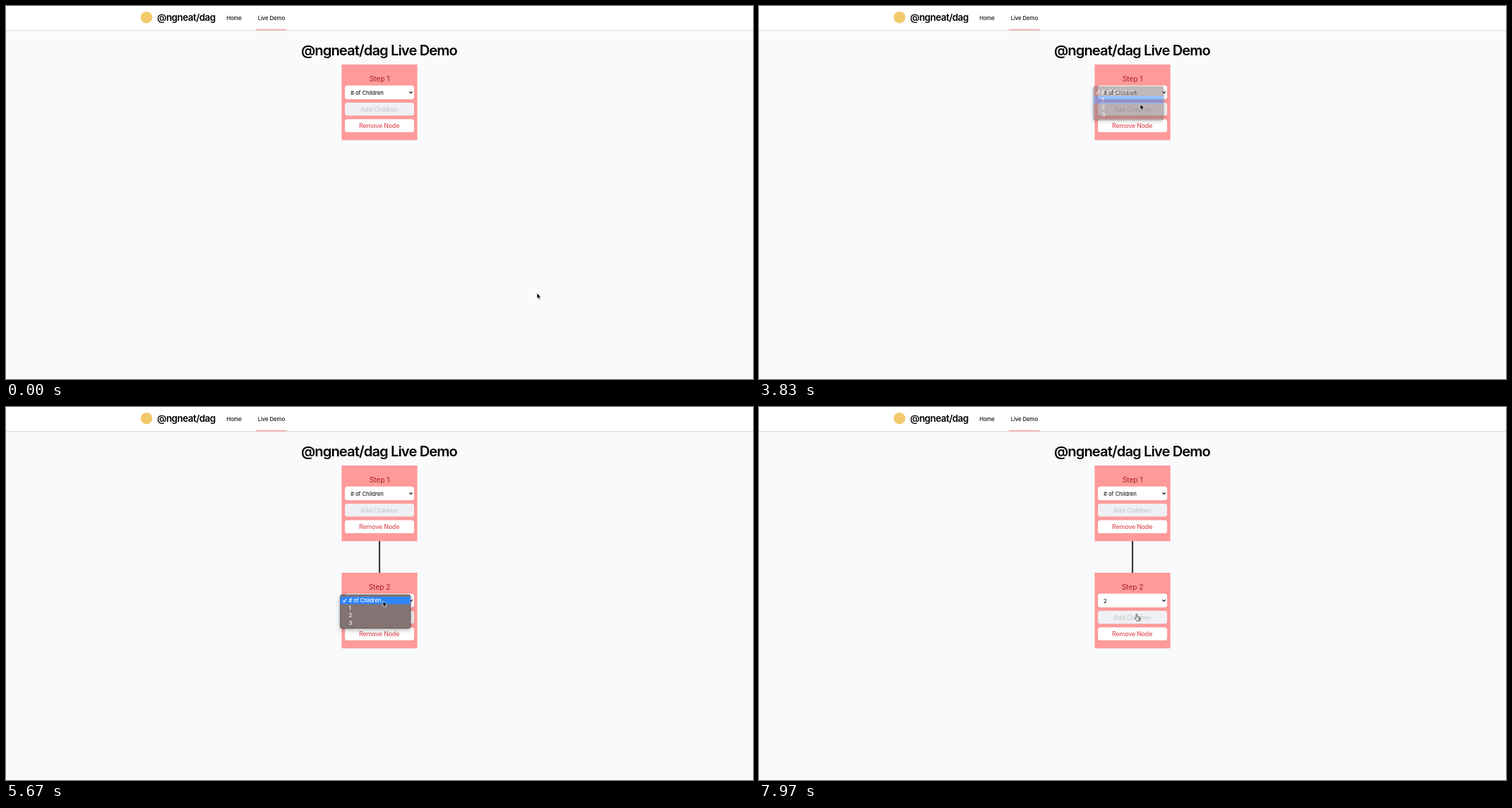
Write an HTML page that moves like this. It is 1058 px wide and 529 px high and loops after 8000 ms.

```html
<!DOCTYPE html>
<html lang="en">
<head>
<meta charset="utf-8">
<title>Live Demo</title>
<style>
html, body { margin: 0; width: 100%; height: 100%; overflow: hidden; background: #f9fafc; }
svg { display: block; width: 100vw; height: 100vh; }
text { font-family: Inter, Roboto, sans-serif; font-optical-sizing: none; white-space: pre; }
.brand { font-size: 13.4px; font-weight: 600; letter-spacing: -.037em; }
.link { font-size: 7.8px; font-weight: 500; letter-spacing: -.012em; fill: #161616; }
.title { font-size: 20.1px; font-weight: 600; letter-spacing: -.043em; text-anchor: middle; }
.step { font-size: 10.1px; fill: #a91e22; text-anchor: middle; }
.value { font-size: 7.8px; letter-spacing: -.01em; }
.button { font-size: 8.9px; font-weight: 500; letter-spacing: -.02em; fill: #df5459; text-anchor: middle; }
.item { font-size: 7.6px; font-weight: 500; letter-spacing: -.01em; fill: #fff; }
.menu { filter: drop-shadow(0 2px 3px rgba(0, 0, 0, .3)); }
</style>
</head>
<body>
<svg id="stage" viewBox="0 0 1058 529">
  <rect width="1058" height="529" fill="#f9fafc"/>
  <rect width="1058" height="36" fill="#eeeff1"/>
  <rect width="1058" height="35" fill="#dedfe2"/>
  <rect width="1058" height="34" fill="#fff"/>
  <circle cx="199" cy="16.2" r="8.3" fill="#f2c96b"/>
  <text class="brand" x="214" y="21.4">@ngneat/dag</text>
  <text class="link" x="312.2" y="19.6">Home</text>
  <text class="link" x="356.7" y="19.6">Live Demo</text>
  <rect x="354" y="33" width="43.3" height="1.3" fill="#f99"/>
  <text class="title" x="528.5" y="70.4">@ngneat/dag Live Demo</text>
</svg>
<script>
const LOOP = 8000, GAP = 152, ROW = 10.6;
const OPTIONS = ['# of Children', '1', '2', '3'];
const stage = document.getElementById('stage');

// Pointer path: time, x, y
const PATH = [
  [0, 752, 407], [1000, 752, 407], [1100, 752, 408], [1400, 752, 408],
  [2200, 544, 123], [2300, 544, 123], [2530, 543.5, 125], [3070, 541, 135],
  [3630, 541, 135], [3830, 540, 139], [4230, 538.5, 141.5], [4530, 538.5, 141.5],
  [5330, 534, 274], [5670, 534, 275], [5900, 534, 275], [6600, 534, 305],
  [6800, 534, 305], [7230, 534, 299], [7600, 534, 297], [7970, 535, 294], [LOOP, 535, 294]
];
// Dropdown life: card, opening, start and end of fading
const MENUS = [
  { card: 0, open: 2320, fade: 3730, end: 3930 },
  { card: 1, open: 5390, fade: 7700, end: 7900 }
];

function group(markup, className = '') {
  const g = document.createElementNS('http://www.w3.org/2000/svg', 'g');
  g.setAttribute('class', className);
  g.innerHTML = markup;
  return stage.appendChild(g);
}
const show = (el, on) => el.style.display = on ? '' : 'none';
const place = (el, x, y) => el.setAttribute('transform', `translate(${x} ${y})`);
const clamp = v => Math.min(1, Math.max(0, v));

const box = (y, h, name) =>
  `<rect class="${name}" x="480" y="${y + .5}" width="98" height="${h}" rx="3.6" fill="#d98787" opacity=".35"/>
   <rect class="${name}-face" x="480" y="${y}" width="98" height="${h}" rx="3.6" fill="#fff"/>`;

function makeCard(i) {
  const g = group(`
    <rect x="475.4" y="83" width="107.2" height="107.3" fill="#fe9a9a"/>
    <text class="step" x="529" y="106.6">Step ${i + 1}</text>
    ${box(112.7, 19.6, 'select')}
    <text class="value" x="488" y="125.6"></text>
    <path d="M571.4 121.4l2.1 2.2 2.1-2.2" fill="none" stroke="#111" stroke-width="1.3"/>
    ${box(137, 18.6, 'add')}
    <text class="button" x="528.6" y="149.5">Add Children</text>
    ${box(160.4, 18.7, 'remove')}
    <text class="button" x="528.6" y="173">Remove Node</text>`);
  place(g, 0, i * GAP);
  const find = s => g.querySelector(s);
  return { g, value: find('.value'), face: find('.add-face'), label: find('.button') };
}

const link = group('<path d="M529 190V235" stroke="#343438" stroke-width="2.1"/>');
const cards = [0, 1].map(makeCard);
const menu = group(`
  <rect x="473.3" y="114.3" width="99.6" height="47.6" rx="3" fill="#837373" stroke="#514848" stroke-width=".7"/>
  <rect id="mark" x="473.3" width="99.6" height="${ROW}" fill="#2f86fc"/>
  <path d="M477.3 122.6l1.6 2 3-4.5" fill="none" stroke="#fff" stroke-width="1.1"/>` +
  OPTIONS.map((s, i) => `<text class="item" x="485.5" y="${125 + i * ROW}">${s}</text>`).join(''), 'menu');
const mark = document.getElementById('mark');
const arrow = group(`<path d="M0 0V8.3L1.9 6.6 3.1 9.4 4.5 8.8 3.3 6.1H5.8Z"
  fill="#000" stroke="#fff" stroke-width=".7" stroke-linejoin="round"/>`);
const hand = group(`<path d="M-.9 5.8V.5A.9.9 0 0 1 .9.5V3.4L4 4Q5.2 4.3 5 5.8L4.4 9.3H.2L-2.5 6Q-2 4.6-.9 5.8Z
  M2.1 5V7.6M3.5 5.2V7.6" fill="#fff" stroke="#222" stroke-width=".75" stroke-linejoin="round"/>`);

function pointerAt(t) {
  const i = PATH.findIndex(p => p[0] > t);
  const [t0, x0, y0] = PATH[i - 1], [t1, x1, y1] = PATH[i];
  const u = (t - t0) / (t1 - t0), k = u * u * (3 - 2 * u);
  return [x0 + (x1 - x0) * k, y0 + (y1 - y0) * k];
}

function overButton(x, y) {
  const v = (y - 83) % GAP;
  return x > 480 && x < 578 && (v > 54 && v < 72.6 || v > 77.4 && v < 96);
}

function setCard(card, value, enabled) {
  card.value.textContent = value;
  card.face.setAttribute('fill', enabled ? '#f9fafb' : '#eff0f3');
  card.label.style.fill = enabled ? '' : '#c8c9ce';
}

function draw(t) {
  const [x, y] = pointerAt(t);
  const split = t >= 4530;
  show(link, split);
  show(cards[1].g, split);
  const picked = t >= 3930 && !split;
  setCard(cards[0], OPTIONS[picked ? 1 : 0], picked);
  setCard(cards[1], OPTIONS[t >= 7900 ? 2 : 0], false);

  const m = MENUS.find(m => t >= m.open && t < m.end);
  show(menu, m);
  if (m) {
    const top = 117 + m.card * GAP;
    const [, rowY] = pointerAt(Math.min(t, m.fade - 100));
    const row = Math.min(3, Math.max(0, Math.floor((rowY - top) / ROW)));
    mark.setAttribute('y', 117 + row * ROW);
    place(menu, 0, m.card * GAP);
    menu.style.opacity = 1 - clamp((t - m.fade) / (m.end - m.fade));
  }

  const pointing = !m && overButton(x, y);
  show(hand, pointing);
  show(arrow, !pointing);
  place(pointing ? hand : arrow, x, y);
}

const start = performance.now();
function tick() {
  draw((performance.now() - start) % LOOP);
  requestAnimationFrame(tick);
}
tick();
</script>
</body>
</html>
```
